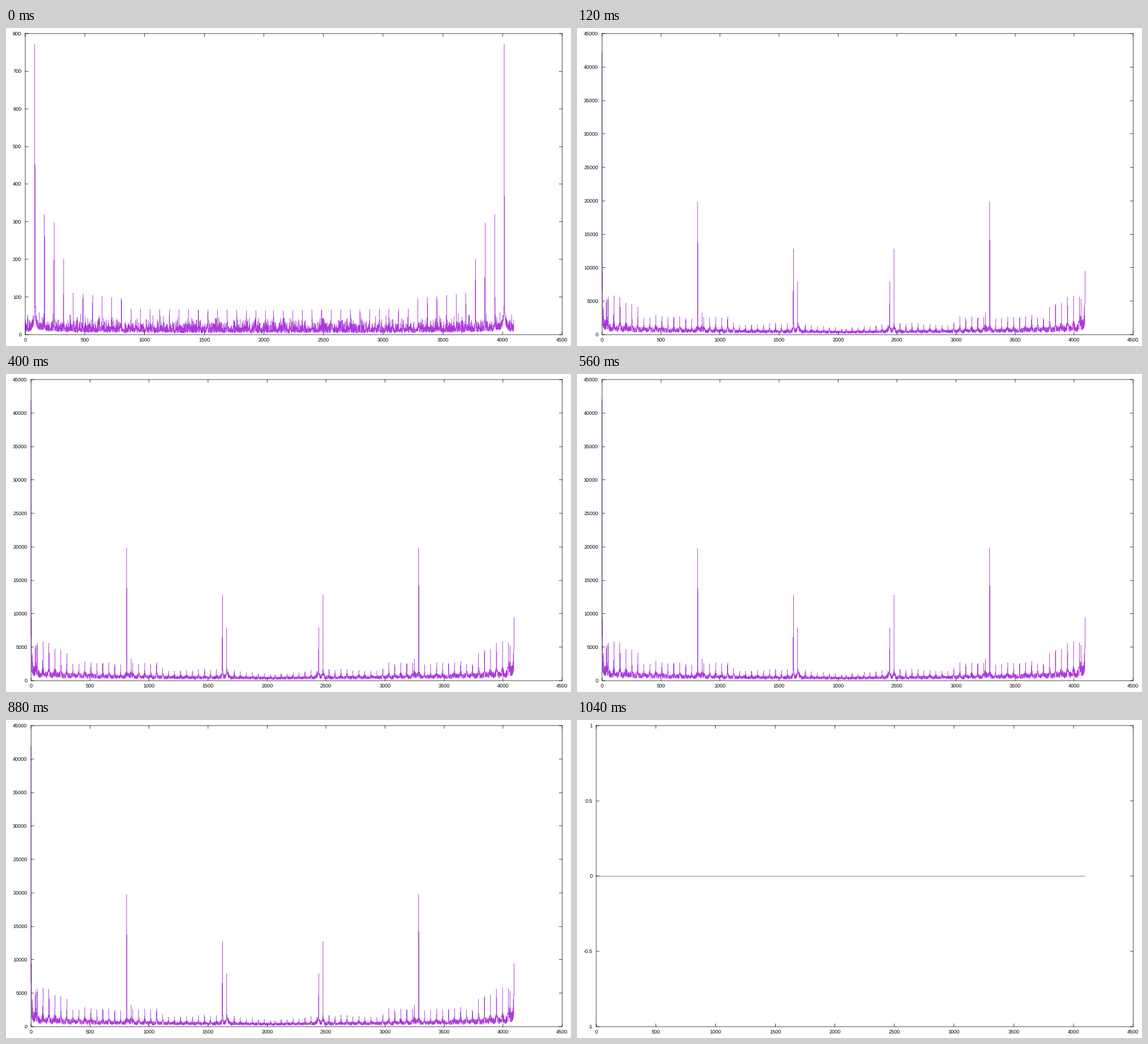
Recreate the animation shown at these times as a matplotlib script. Size 998 by 561 pixels, loop 1080 ms.

```python
import numpy as np
import matplotlib.pyplot as plt
from matplotlib.animation import FuncAnimation

W, H, DPI = 998, 561, 64
PX = 72 / DPI                     # one stage pixel in points
FRAMES, STEP = 27, 40

# The chart is laid out on a finer pixel grid and scaled down to the stage.
CELL = W / 1366
TOP, BOTTOM, RIGHT = 13, 740, 1344
N, X_MAX = 4096, 4500
INK, PURPLE, GREY = "black", "#9400d3", "#333333"

plt.rcParams.update({"font.family": "Liberation Sans",
                     "text.hinting": "none", "path.simplify": False})

bins = np.arange(N // 2 + 1)


def stage(cell):
    """Centre of a fine grid cell in stage pixels."""
    return (cell + 0.5) * CELL


def mirror(half):
    """Full spectrum of a real signal from its lower half."""
    return np.concatenate([half, half[-2:0:-1]])


def quiet_spectrum():
    rng = np.random.default_rng(4)
    v = 2 + rng.rayleigh(13, bins.size) * rng.uniform(0.1, 1.35, bins.size)
    v += (230 / (np.abs(bins - 81) + 4) - 2.5).clip(0)
    for n in range(1, 26):
        k = round(80.6 * n)
        h = np.interp(n, [1, 2, 3, 4, 5, 10, 11, 25],
                      [770, 318, 296, 200, 110, 95, 68, 64])
        v += 0.06 * h / (1 + np.abs(bins - k) / 3)
        v[k - 1:k + 1] = 0.7 * h, h
    return mirror(v)


def loud_spectrum():
    rng = np.random.default_rng(11)
    comb = np.arange(1, 41)
    heights = np.interp(comb, [1, 5, 7, 21, 23, 31, 40],
                        [6100, 4900, 2700, 2450, 1400, 1700, 950])
    heights *= rng.uniform(0.9, 1.1, comb.size)
    peaks = dict(zip(np.round(comb * 811 / 16).astype(int), heights))
    peaks |= {37: 5300, 811: 19800, 848: 3250, 1622: 12800, 1658: 7900}

    v = 420 + 600 * np.exp(-bins / 700) + 4500 * np.exp(-bins / 12)
    for k, h in peaks.items():
        d = np.abs(bins - k)
        v += min(0.3 * h, 1500) / (1 + d / 5) * np.exp(-d / 24)
    v *= rng.uniform(0.35, 1.25, bins.size)
    for k, h in peaks.items():
        v[k - 1:k + 1] = 0.55 * h, h
    v[:4] = 42000, 6600, 9450, 8000
    return mirror(v)


quiet, loud, silent = quiet_spectrum(), loud_spectrum(), np.zeros(N)

fig = plt.figure(figsize=(W / DPI, H / DPI), dpi=DPI, facecolor="white")
ax = fig.add_axes([0, 0, 1, 1])


def line(xs, ys):
    ax.plot(stage(np.array(xs)), stage(np.array(ys)), color=INK,
            lw=CELL * PX, snap=False, zorder=3, solid_capstyle="projecting")


def label(x, y, value, ha):
    ax.text(x, y, f"{value:g}", ha=ha, va="baseline", fontsize=9.1 * PX)


def trace(x, y, color):
    """Draw a polyline as one vertical run per grid column."""
    cols = np.arange(round(x[0]), round(x[-1]) + 1)
    edges = cols[1:] - 0.5
    at_edge = np.interp(edges, x, y)
    xs = np.concatenate([x, edges - 1e-6, edges])
    ys = np.concatenate([y, at_edge, at_edge])
    order = np.argsort(xs, kind="stable")
    xs, ys = xs[order], ys[order]
    starts = np.searchsorted(xs, cols - 0.5)
    lo = np.minimum.reduceat(ys, starts)
    hi = np.maximum.reduceat(ys, starts)
    ax.vlines(stage(cols), stage(lo - 0.5), stage(hi + 0.5), color=color,
              lw=CELL * PX, snap=False, capstyle="butt", zorder=2)


def plot(values, left, lo, hi, step, color=PURPLE):
    ax.cla()
    ax.set(xlim=(0, W), ylim=(H, 0))
    ax.axis("off")

    def gx(x):
        return left + x / X_MAX * (RIGHT - left)

    def gy(y):
        return BOTTOM - (y - lo) / (hi - lo) * (BOTTOM - TOP)

    trace(gx(np.arange(N)), gy(values), color)

    line([left, RIGHT, RIGHT, left, left], [TOP, TOP, BOTTOM, BOTTOM, TOP])
    for value in range(0, X_MAX + 1, 500):
        x = round(gx(value))
        line([x, x], [TOP, TOP + 7])
        line([x, x], [BOTTOM, BOTTOM - 7])
        label(stage(x), 553, value, "center")
    for value in np.arange(lo, hi + step / 2, step):
        y = round(gy(value))
        line([left, left + 7], [y, y])
        line([RIGHT, RIGHT - 7], [y, y])
        label(stage(left) - 6.7, stage(y) + 3, value, "right")


def draw(i):
    if i == 0:
        plot(quiet, 46, 0, 800, 100)
    elif i == FRAMES - 1:
        plot(silent, 46, -1, 1, 0.5, GREY)
    else:
        jitter = np.random.default_rng(i).normal(0, 0.002, bins.size)
        plot(loud * (1 + mirror(jitter)), 60, 0, 45000, 5000)
    return []


anim = FuncAnimation(fig, draw, frames=FRAMES, interval=STEP,
                     init_func=lambda: [], repeat=True, repeat_delay=0)
plt.show()
```
